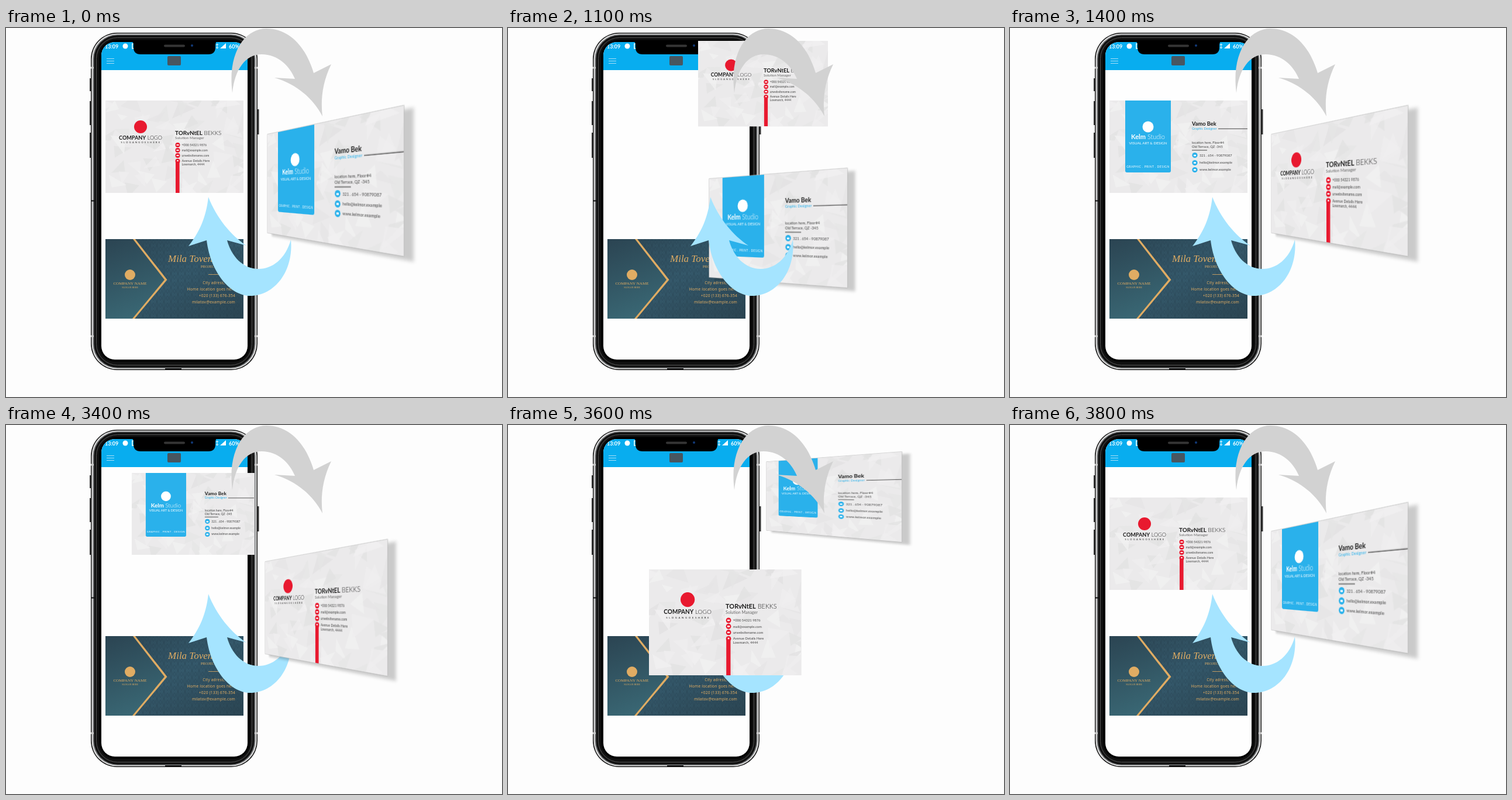
An HTML page for the animation above (4800 ms loop, 848 by 631 pixels).

```html
<!DOCTYPE html>
<html lang="en">
<head>
<meta charset="utf-8">
<title>Business card swap</title>
<style>
  html, body { margin: 0; width: 100%; height: 100%; overflow: hidden; background: #fdfdfd; }
  #stage { position: relative; width: 848px; height: 631px; overflow: hidden; }
  #stage > * { position: absolute; left: 0; top: 0; }
  svg { display: block; }
  text { font-family: Lato, sans-serif; white-space: pre; }
  .card { width: 236px; height: 158px; transform-origin: 0 0; }
  .card.tilted { box-shadow: 0 0 0 .6px #bbb, 11px 4px 4px #0003; }
  .bold { font-weight: 700; }
  .thin { font-weight: 300; }
  .gold { fill: #e0ac63; }
  .gold text { font-family: "Noto Sans", sans-serif; }
  .gold .serif { font-family: "Liberation Serif", serif; }
  #arrows { z-index: 2; }
</style>
</head>
<body>
<div id="stage">
  <svg width="848" height="631">
    <defs>
      <linearGradient id="teal" x2="1" y2="1">
        <stop offset="0" stop-color="#2c4654"/><stop offset=".5" stop-color="#34586a"/><stop offset="1" stop-color="#2b4552"/>
      </linearGradient>
      <linearGradient id="slate" x2=".3" y2="1">
        <stop offset="0" stop-color="#2b4452"/><stop offset="1" stop-color="#396673"/>
      </linearGradient>
      <pattern id="damask" width="12" height="12" patternUnits="userSpaceOnUse">
        <path d="M6 0Q10 6 6 12Q2 6 6 0M0 2Q4 6 0 10M12 2Q8 6 12 10" fill="none" stroke="#1d3541" stroke-opacity=".3"/>
      </pattern>
      <clipPath id="screen"><rect x="163" y="24" width="250" height="543" rx="23"/></clipPath>
      <g id="facets"></g>
    </defs>

    <g id="phone">
      <path d="M144.5 86v22M144.5 125v41M144.5 179v43M431 139v43" stroke="#333" stroke-width="3"/>
      <rect x="145" y="8" width="285" height="577" rx="45" fill="#161616"/>
      <rect x="146.5" y="9.5" width="282" height="574" rx="43.5" fill="#e2e2e2"/>
      <rect x="148.5" y="11" width="278" height="571" rx="42" fill="#77797b"/>
      <rect x="150.5" y="12.500" width="274" height="568" rx="40" fill="#111"/>
      <rect x="154.500" y="16.500" width="266" height="560" rx="36" fill="none" stroke="#555"/>
      <rect x="159" y="20.5" width="258" height="550.5" rx="29" fill="#000"/>
      <path d="M145 68h5M145 527h5M425 68h5M425 527h5" stroke="#ccc" stroke-width="3"/>
      <path d="M146 295.500h6M272 583h28" stroke="#111" stroke-width="2"/>
      <g clip-path="url(#screen)">
        <rect x="163" y="24" width="250" height="543" fill="#fefefe"/>
        <rect x="163" y="24" width="250" height="48" fill="#08adef"/>
        <g fill="#fff" font-size="9" class="bold">
          <text x="169" y="35" font-family="Roboto">13:09</text>
          <circle cx="204" cy="31" r="4.500"/>
          <path d="M219 27h-3v8h3" fill="none" stroke="#fff" stroke-width="1.500"/>
          <path d="M361 27v8M359 29l2-2 2 2M359 33l2 2 2-2" fill="none" stroke="#fff"/>
          <path d="M366 35h10v-9z"/>
          <text x="381" y="35" font-family="Roboto">60%</text>
        </g>
        <path d="M172 52.500h13M172 56.500h13M172 60.500h13" stroke="#a9dff7"/>
        <rect x="276" y="48" width="23" height="16" rx="2" fill="#485660"/>
      </g>
      <path d="M213 22q5 1 5 7v4q0 12 12 12h116q12 0 12-12v-4q0-6 5-7z"/>
      <path d="M272 30.500h32" stroke="#353535" stroke-width="4" stroke-linecap="round"/>
      <circle cx="318" cy="30" r="2" fill="#123a78"/>
    </g>

    <g id="darkCard">
      <rect x="170" y="361" width="236" height="136" fill="url(#teal)"/>
      <rect x="170" y="361" width="236" height="136" fill="url(#damask)"/>
      <path d="M170 361h48l55 69-55 67h-48z" fill="url(#slate)"/>
      <path d="M217 361h4l54.500 69.500L220 497h-4l55-66.500z" class="gold"/>
      <g class="gold">
        <circle cx="212" cy="422" r="9"/>
        <g text-anchor="middle">
          <text class="serif" x="212" y="439" font-size="7.100">COMPANY NAME</text>
          <text class="serif" x="212" y="444.500" font-size="4">SLOGAN HERE</text>
        </g>
        <text class="serif" x="277" y="400" font-size="17" font-style="italic">Mila Toven</text>
        <text class="serif" x="333" y="410" font-size="6.400">PROJECT MANAGER</text>
        <rect x="346" y="421" width="46" height=".8"/>
        <g text-anchor="end" font-size="6.600" letter-spacing=".2">
          <text x="392" y="437.500">City adress, 5678</text>
          <text x="392" y="449">Home location goes here</text>
          <text x="392" y="460">+020 (133) 676-354</text>
          <text x="392" y="471">milatov@example.com</text>
        </g>
      </g>
    </g>
  </svg>

  <div class="card" id="blue">
    <svg width="236" height="158">
      <rect width="236" height="158" fill="#ebeaeb"/>
      <use href="#facets"/>
      <path d="M27 0h78v120q0 3-3 3H30q-3 0-3-3z" fill="#2ab1eb"/>
      <g fill="#fff" text-anchor="middle">
        <circle cx="66" cy="45" r="9.500"/>
        <text x="66" y="66.500" font-size="11"><tspan class="bold">Kelm</tspan><tspan class="thin"> Studio</tspan></text>
        <text x="66" y="75" font-size="6.300">VISUAL ART &amp; DESIGN</text>
        <text x="66" y="115.500" font-size="5" letter-spacing=".5">GRAPHIC . PRINT . DESIGN</text>
      </g>
      <text class="bold" x="141" y="43" font-size="9.300" fill="#1c1c1c">Vamo Bek</text>
      <text x="141" y="50" font-size="5.600" fill="#2ab1eb">Graphic Designer</text>
      <path d="M186 48.300h50M141 85h26" stroke="#333" stroke-width=".9"/>
      <g fill="#444" font-size="5.700">
        <text x="141" y="74">location here, Floor#4</text>
        <text x="141" y="81">Old Terrace, QZ -345</text>
        <text x="154" y="96">321 . 654 - 90879087</text>
        <text x="154" y="108.500">hello@kelmor.example</text>
        <text x="154" y="120">www.kelmor.example</text>
      </g>
      <g fill="#2ab1eb"><circle cx="146" cy="93.500" r="4.600"/><circle cx="146" cy="106.500" r="4.600"/><circle cx="146" cy="118.500" r="4.600"/></g>
      <path d="M144 94h4M144 106.500h4M144 118.500h4" stroke="#fff" stroke-width="2.600"/>
    </svg>
  </div>

  <div class="card" id="red">
    <svg width="236" height="158">
      <rect width="236" height="158" fill="#ebeaeb"/>
      <use href="#facets"/>
      <circle cx="60" cy="45" r="11" fill="#e8192f"/>
      <g text-anchor="middle" fill="#1c1c1c">
        <text x="60" y="66.500" font-size="9.100"><tspan class="bold">COMPANY</tspan><tspan class="thin"> LOGO</tspan></text>
        <text x="61" y="73" font-size="4" letter-spacing="2.300">SLOGANGOESHERE</text>
      </g>
      <text x="119" y="58.500" font-size="9.900" fill="#1c1c1c"><tspan class="bold">TORvNtEL</tspan><tspan class="thin"> BEKKS</tspan></text>
      <text x="119" y="66" font-size="6.400" fill="#666">Solution Manager</text>
      <g fill="#444" font-size="5.300">
        <text x="130.500" y="77.500">+000 54321 9876</text>
        <text x="130.500" y="87">mail@example.com</text>
        <text x="130.500" y="96">urwebsitename.com</text>
        <text x="130.500" y="104.500">Avenue Details Here</text>
        <text x="130.500" y="111">Lowmarch, 4444</text>
      </g>
      <g fill="#e8192f">
        <rect x="120" y="104" width="6.600" height="54"/>
        <circle cx="123.500" cy="76" r="4"/><circle cx="123.500" cy="85" r="4"/><circle cx="123.500" cy="94" r="4"/><circle cx="123.500" cy="103.500" r="4"/>
      </g>
      <path d="M121.500 76h4M121.500 85h4M121.500 94h4M122.300 103h2.400" stroke="#fff" stroke-width="2.200"/>
    </svg>
  </div>

  <svg id="arrows" width="848" height="631">
    <path fill="#d2d2d2" d="M387 111C378 40 410 1 445 1C490 1 515 40 526 77L556 62C540 95 538 125 541 151C525 120 495 95 459 85L494 87C485 65 465 45 437 45C410 45 391 70 387 111Z"/>
    <path fill="#a5e4ff" d="M346 289C342 325 330 350 312 373L343 363C350 420 385 458 417 458C460 458 492 415 487 362C478 395 455 412 432 412C405 412 385 390 378 363L411 372C385 355 360 325 346 289Z"/>
  </svg>
</div>

<script>
const W = 236, H = 158, HALF = 2400;
const red = document.getElementById('red'), blue = document.getElementById('blue');

// Poses: [left, right, top-left, top-right, bottom-right, bottom-left]
const flat = (x, y, w, h) => [x, x + w, y, y, y + h, y + h];
const inPhone = flat(170, 124, 236, 158);
const beside = [447, 680, 182, 133, 390, 350];
const leaving = [inPhone, flat(215, 82, 209, 140), flat(325, 22, 222, 146),
  [442, 673, 63, 46, 200, 180], [494, 727, 108, 78, 286, 258]];
const arriving = [beside, [443, 652, 234, 196, 429, 391], [344, 580, 258, 240, 444, 426],
  flat(241, 247, 260, 181), flat(200, 184, 248, 170)];

function place(card, [x0, x1, tl, tr, br, bl]) {
  // Vertical sides: depth follows from the ratio of their heights
  const k = (bl - tl) / (br - tr), g = k - 1;
  const m = [(x1 * k - x0) / W, (tr * k - tl) / W, 0, g / W,
    0, (bl - tl) / H, 0, 0, 0, 0, 1, 0, x0, tl, 0, 1];
  card.style.transform = `matrix3d(${m.map(v => v.toFixed(8))})`;
  card.classList.toggle('tilted', tl !== tr);
}

function drawFacets() {
  let seed = 11;
  const rnd = () => (seed = seed * 16807 % 2147483647) / 2147483647;
  const shades = ['#f2f1f2', '#e2e1e2', '#e6e5e6', '#efeeef'];
  let out = '';
  for (let i = 0; i < 70; i++) {
    const cx = rnd() * W, cy = rnd() * H, turn = rnd() * 6.3;
    const pts = [0, 1.6, 3.4].map(a => {
      const r = 8 + rnd() * 16;
      return [cx + r * Math.cos(a + turn), cy + r * Math.sin(a + turn)].map(v => v.toFixed(1));
    });
    out += `<polygon points="${pts.join(' ')}" fill="${shades[i % 4]}" opacity=".75"/>`;
  }
  document.getElementById('facets').innerHTML = out;
}

function frame(now) {
  const t = now % (2 * HALF), u = t % HALF;
  const step = u < 1000 ? 0 : Math.min(5, Math.floor((u - 900) / 100));
  const redLeaves = (t < HALF) === (step < 5);
  place(redLeaves ? red : blue, leaving[step % 5]);
  place(redLeaves ? blue : red, arriving[step % 5]);
  red.style.zIndex = t < 1200 ? 1 : 3;
  blue.style.zIndex = 1;
  requestAnimationFrame(frame);
}

drawFacets();
requestAnimationFrame(frame);
</script>
</body>
</html>
```
